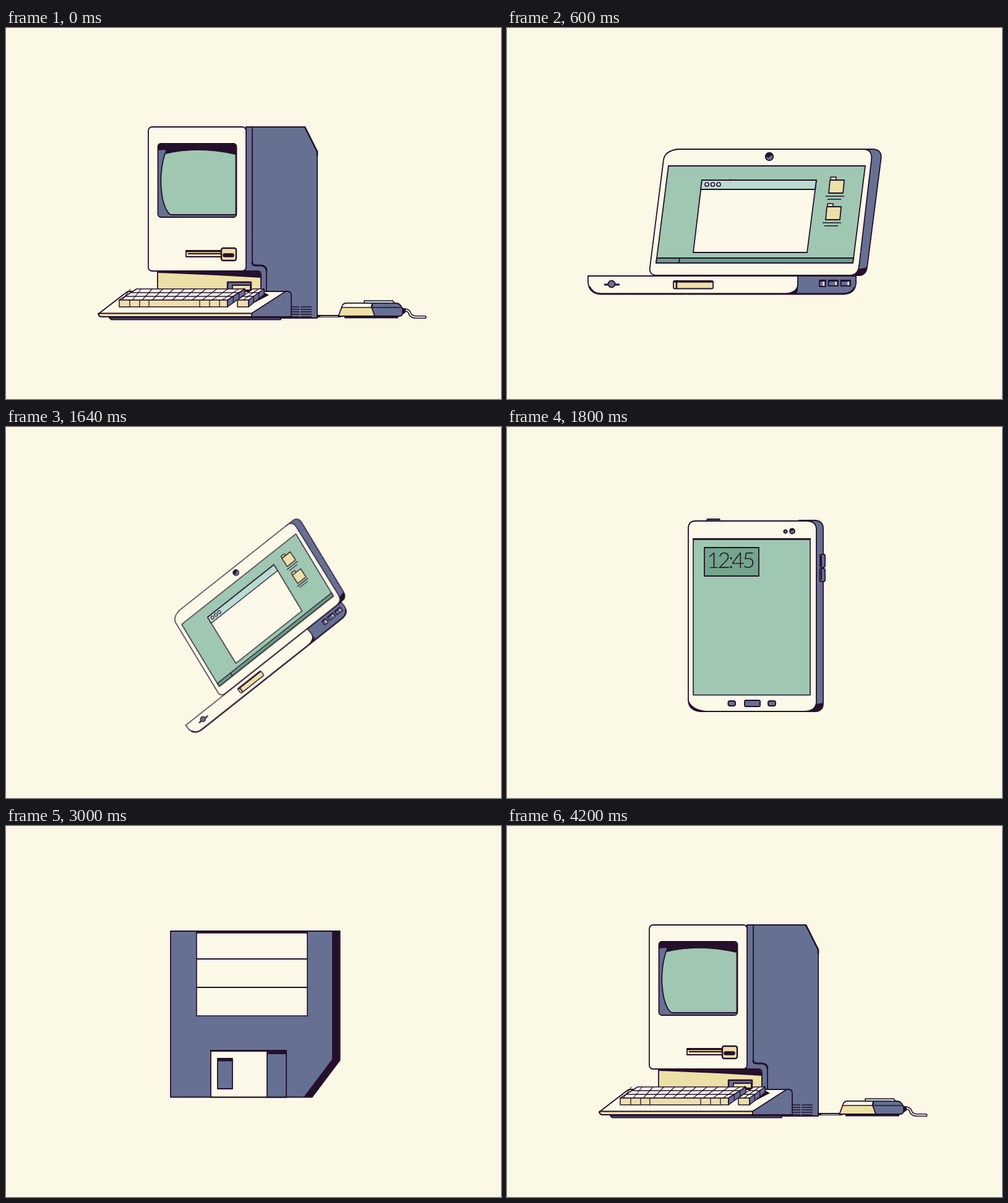
Recreate the animation shown at these times as an HTML page. Size 800 by 600 pixels, loop 4.8 s.

```html
<!DOCTYPE html>
<html lang="en">
<head>
<meta charset="utf-8">
<title>Device loop</title>
<style>
html, body { margin: 0; width: 100%; height: 100%; overflow: hidden; background: #fbf8e6; }
svg { display: block; width: 100vw; height: 100vh; }
</style>
</head>
<body>
<svg id="stage" viewBox="0 0 800 600">
  <filter id="rough" filterUnits="userSpaceOnUse" x="0" y="0" width="800" height="600" color-interpolation-filters="sRGB">
    <feTurbulence type="fractalNoise" baseFrequency=".3" numOctaves="1" seed="4"/>
    <feDisplacementMap in="SourceGraphic" scale="1.6" xChannelSelector="R" yChannelSelector="G"/>
  </filter>
</svg>
<script>
const INK = '#25102c', PAPER = '#fcf9e8', BLUE = '#667092', GREEN = '#9fc7b2',
      MOSS = '#73a68c', MINT = '#b9dbd0', SAND = '#ede0a7';
const svg = document.getElementById('stage');

const path = (d, fill = 'none', w = 1.8, stroke = INK) =>
  `<path d="${d}" fill="${fill}" stroke="${stroke}" stroke-width="${w}"/>`;
const solid = d => path(d, INK, 0);
const box = (x, y, x2, y2, fill, r = 0, w = 1.8) =>
  `<rect x="${x}" y="${y}" width="${x2 - x}" height="${y2 - y}" rx="${r}" fill="${fill}" stroke="${INK}" stroke-width="${w}"/>`;
const dot = (x, y, r, fill, w = 1.8) =>
  `<circle cx="${x}" cy="${y}" r="${r}" fill="${fill}" stroke="${INK}" stroke-width="${w}"/>`;

// Block of keys in oblique view: front-left corner, column edges, rows
function keys(x, y, cols, rows, dx, dy) {
  const end = cols[cols.length - 1], h = 11;
  let s = path(`M${x} ${y}L${x + dx} ${y - dy}H${end + dx}L${end} ${y}Z`, PAPER, 1.5)
        + path(`M${end} ${y}l${dx} ${-dy}v9L${end} ${y + h}Z`, BLUE, 1.5)
        + path(`M${x} ${y}H${end}v${h}H${x}Z`, SAND, 1.5);
  for (let i = 1; i < rows; i++) {
    const k = i / rows;
    s += path(`M${x + dx * k} ${y - dy * k}H${end + dx * k}v10`, 'none', 1.4);
  }
  for (const c of cols) s += path(`M${c} ${y}v${h}`, 'none', 1.3);
  return s;
}

function desktop() {
  const cable = 'M642 456H646Q652 457 653 463Q656 467.5 663 467.5H677';
  let s = path('M388 160H483L503 200V469H420V388H388Z', BLUE)
    + path('M483 160L503 200V207', 'none', 2.6)
    + path('M245 393H412V425H245Z', SAND)
    + path('M388 160H398V379Q398 384 404 384H412Q421 385 421 393V428H412V398Q412 393 405 393H384Z', BLUE)
    + path('M398 379Q398 384 404 384H412Q421 385 421 393', 'none', 3)
    + solid('M245 393H410L412 404Q330 399 245 396Z')
    + box(358, 411, 396, 424, BLUE, 0, 2.4) + box(366, 416, 395, 424, SAND)
    + box(230, 160, 388, 393, PAPER, 6)
    + box(245.5, 187, 372.5, 306, BLUE, 5)
    + path('M257 203Q310 190 371.5 204V302H266Q258 297 253 276Q246 238 257 203Z', GREEN)
    + solid('M245 198V191Q246 186 251 186H367Q373 187 373 192V205Q310 190 257 204L258 197Z')
    + box(291, 360, 350, 370, SAND) + path('M291 361.5H349M294 365H348', 'none', 2)
    + box(348, 356, 372, 376, SAND, 3, 2.4) + box(351, 365, 368, 370, INK, 2, 1.4);
  for (let y = 451; y < 468; y += 4) s += path(`M461 ${y}H474M476 ${y}H494`, 'none', 1.4);

  s += path('M167 468.5H444V471.5H170Z', BLUE)
    + path('M397 467V461L447 428Q451 425 456 426Q461 427 461 432V467Z', BLUE)
    + path('M151 461L194 428Q196 426 200 426H452L397 461.5Q396 467 398 467H154Q149 466 149 462Z', PAPER)
    + path('M150 461.5H397L397 467H154Q149 466 150 461.5Z', SAND)
    + solid('M390 440L418 428L425 432L396 447Z')
    + keys(183, 440, [200, 216, 231, 313, 329, 345, 358], 3, 28, 18);
  // Key gaps lean further towards the right
  for (let i = 0; i < 11; i++) s += path(`M${188 + i * 16.1} 440l${13 + i * 1.4} -18`, 'none', 1.2);
  s += keys(374, 440, [392], 3, 25, 18) + path('M383 440l25 -18', 'none', 1.3);

  return s + path('M503 466H542', 'none', 4.2) + path('M508 466.5H536', 'none', .9, PAPER)
    + `<g stroke-linecap="round">${path(cable, 'none', 5.2) + path(cable, 'none', 1.9, PAPER)}</g>`
    + path('M547 468H634', BLUE, 3)
    + path('M538 464L544 448Q546 445 551 445H592L596 466H541Q537 466 538 464Z', SAND)
    + path('M545 447Q547 445 551 445H592L590 452H542Z', PAPER, 1.4)
    + path('M593 445H630Q635 445 638 449L643 457L640 464Q639 466 635 466H596L591 452Z', BLUE)
    + path('M591 452H640', 'none', 1.5)
    + path('M579 445V441H625L628 445Z', MINT, 1.7)
    + solid('M640 452L646 454V460L640 464Z');
}

function folder(x, y) {
  return path(`M${x + 1} ${y}v-5h9v5`, SAND, 1.6)
    + path(`M${x} ${y}h23l-2 21h-23Z`, SAND)
    + path(`M${x - 7} ${y + 26}h30M${x - 4} ${y + 31}h22`, 'none', 1.5);
}

function laptop() {
  const port = (x, w, h) => box(x, 408, x + w, 408 + h, BLUE)
    + path(`M${x} 409h${w}`, 'none', 2.6) + path(`M${x + w - 3.5} 410v${h - 3}`, 'none', 2, PAPER);
  let s = path('M572 196H592Q606 197 604.5 211L582 387Q580 400 568 400H548Z', BLUE)
    + solid('M553 401Q566 399 568 390L582 387Q580 401 568 401Z')
    + path('M276 196H577Q591 197 589 213L569 385Q567 400 553 400H241Q229 399 231 387L253 213Q255 199 276 196Z', PAPER)
    + path('M261 223H579L559 380H241Z', GREEN)
    + path('M242 372H560L559 380H241Z', '#699d84') + path('M279 372L278 380')
    + path('M315 246H500L485 363H301Z', PAPER)
    + path('M315 246H500L498 261H313Z', MINT);
  for (const x of [323, 332.5, 342]) s += dot(x, 253, 3, PAPER, 1.7);
  return s + folder(522, 246) + folder(517, 289)
    + dot(424, 208, 6.3, BLUE) + solid('M418 208A6 6 0 0 1 430 206L425 207L423 210Z')
    + path('M470 401H564V413Q562 430 545 430H450Q468 427 470 415Z', BLUE)
    + path('M131 401H470V415Q469 428 450 430H152Q131 429 131 409Z', PAPER)
    + path('M133 418Q138 430 152 430H545Q558 429 562 419', 'none', 3)
    + solid('M448 430Q466 427 470 418V426Q468 430 460 431Z')
    + path('M157 415H182', 'none', 3) + dot(169, 414, 5.6, BLUE)
    + box(269, 409, 333, 421.5, SAND, 2) + path('M270 410.5H333M274 410V421', 'none', 2.4)
    + port(505, 10, 10) + port(519.5, 15.5, 9) + port(539.5, 15.5, 9);
}

function tablet() {
  return box(323, 149, 344, 154, BLUE, 1.5)
    + path('M472 151H498Q511 152 511 164V447Q511 460 497 460H470Z', BLUE)
    + solid('M470 461Q497 459 500 448L511 446Q511 461 497 461Z')
    + path('M304 152H486Q500 153 500 166V446Q498 460 480 460H314Q293 459 293 441V163Q294 152 304 152Z', PAPER)
    + solid('M292.5 439Q297 457 322 459V461H314Q293 460 292.5 439Z')
    + box(301, 181, 490, 433.5, GREEN, 0, 1.6) + path('M300 181.3H491', 'none', 3)
    + box(319, 195, 407, 241, MOSS)
    + `<text x="323" y="228" font-family="Lato, sans-serif" font-weight="300" font-size="36" letter-spacing="-3.5" fill="${INK}">12:45</text>`
    + dot(450, 169, 2.6, BLUE) + dot(461, 168.5, 4, BLUE) + solid('M457 169A4 4 0 0 1 464 166Z')
    + box(506, 206, 514, 227, BLUE, 2.5) + box(505.5, 229, 514, 250, BLUE, 2.5)
    + path('M508 208V225M508 231V247', 'none', 2)
    + box(357.5, 443, 369, 451, BLUE, 3, 2) + box(384, 442, 409, 452, BLUE, 2, 2)
    + box(422, 443, 434, 451, BLUE, 3, 2);
}

function floppy() {
  return path('M266 170H528V378L482 438.5H266Z', BLUE)
    + solid('M527 169H540.5V379L495 439.5H481L527 377Z')
    + box(308, 171, 487, 307, PAPER, 0, 1.6) + path('M307 171.5H488', 'none', 4.4)
    + path('M307 215H487M307 261H487')
    + box(331, 363, 453, 438.5, PAPER)
    + box(422, 364, 453, 438.5, BLUE) + path('M422 366.5H453', 'none', 5)
    + path('M330 363.5H454', 'none', 3.2)
    + box(342, 376, 366, 425, BLUE) + path('M342 378H366', 'none', 5);
}

// Each device: drawing, pivot, and how it shrinks on leaving
const soft = k => 1 - .0162 * k * k, even = k => 1 - .166 * k;
const devices = [
  { draw: desktop, pivot: 400, shrink: even },
  { draw: laptop, pivot: 400, shrink: soft },
  { draw: tablet, pivot: 400, shrink: soft },
  { draw: floppy, pivot: 390, shrink: even },
];
for (const d of devices) {
  d.node = document.createElementNS('http://www.w3.org/2000/svg', 'g');
  d.node.innerHTML = `<g filter="url(#rough)" stroke-linejoin="round">${d.draw()}</g>`;
  svg.appendChild(d.node);
}

const LOOP = 4800, TURN = 1200, START = 320, STEP = 40, STEPS = 8, SPIN = 2.4;
const grow = left => 1 - .045 * left * left;

function pose(t) {
  const phase = (t % LOOP) - START + LOOP;
  const turn = Math.floor(phase / TURN) % 4;
  const k = Math.min(STEPS, Math.floor(phase % TURN / STEP) + 1);
  const leaving = k <= 4, left = STEPS - k;
  const shown = devices[leaving ? turn : (turn + 1) % 4];
  const angle = SPIN * (leaving ? -k * k : left * left);
  const scale = leaving ? shown.shrink(k) : grow(left);
  for (const d of devices) d.node.setAttribute('display', d === shown ? 'inline' : 'none');
  shown.node.setAttribute('transform',
    `translate(${shown.pivot} 300) rotate(${angle}) scale(${scale}) translate(${-shown.pivot} -300)`);
}

let origin;
function tick(now) {
  origin ??= now;
  pose(now - origin);
  requestAnimationFrame(tick);
}
pose(0);
requestAnimationFrame(tick);
</script>
</body>
</html>
```
